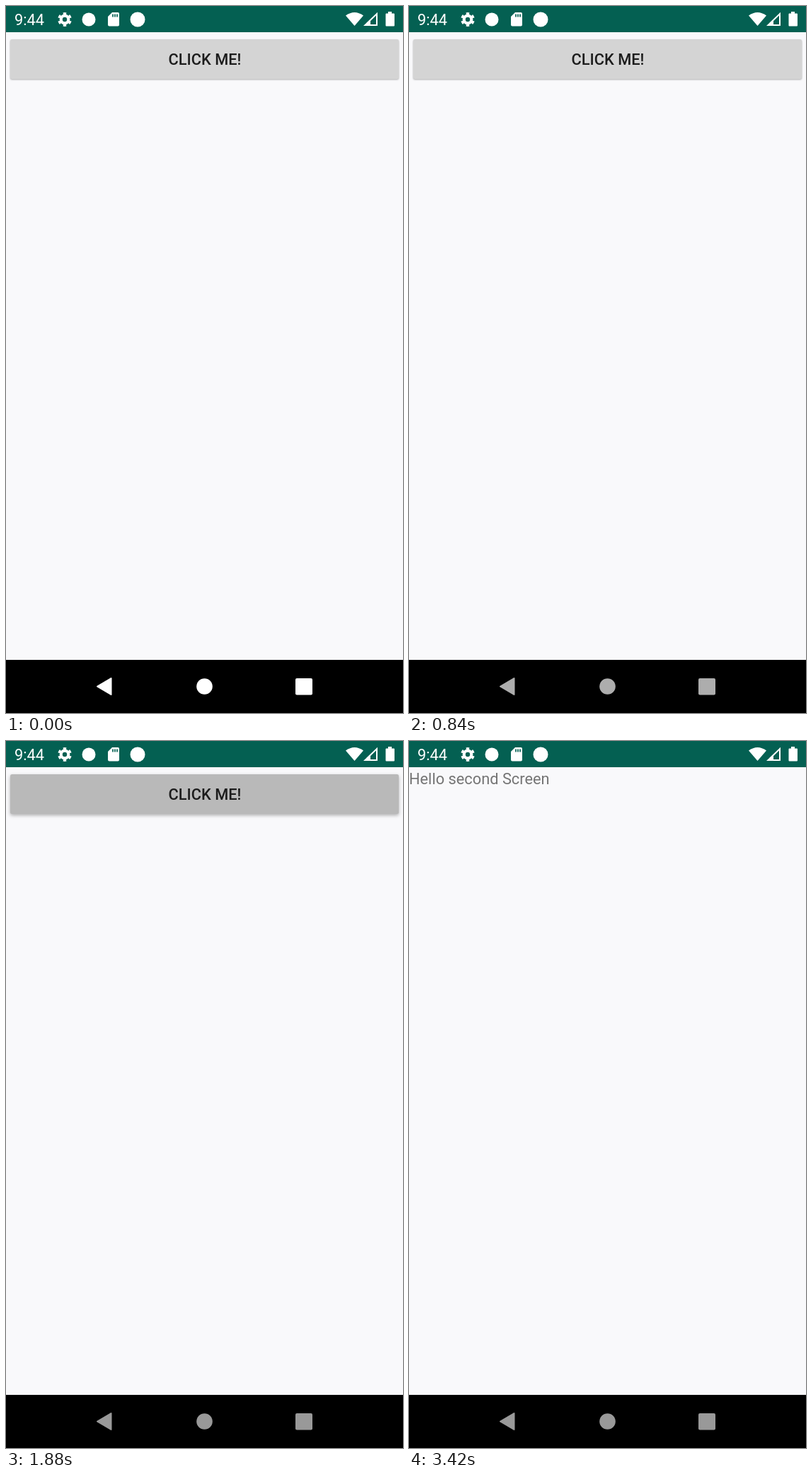
Recreate the animation shown at these times as an HTML page. Size 561 px wide and 998 px high, loop 3460 ms.

```html
<!DOCTYPE html>
<html lang="en">
<head>
<meta charset="utf-8">
<title>Button opens second screen</title>
<style>
  html, body { margin: 0; width: 100%; height: 100%; overflow: hidden; background: #f9f9fb; }
  svg { display: block; }
  text { font: 21.8px Roboto, sans-serif; }
  .label { font-weight: 500; fill: #1c1c1c; text-anchor: middle; }
</style>
</head>
<body>
<svg width="561" height="998" viewBox="0 0 561 998">
  <defs>
    <clipPath id="content"><rect y="37" width="561" height="886"/></clipPath>
    <clipPath id="reveal"><rect id="revealBox" width="561" height="886"/></clipPath>
  </defs>

  <rect width="561" height="998" fill="#f9f9fb"/>
  <g clip-path="url(#content)">
    <g id="first">
      <rect id="button" x="6" y="47" width="549" height="56" rx="2.5"/>
      <text class="label" x="281" y="83">CLICK ME!</text>
    </g>
    <g id="second" clip-path="url(#reveal)">
      <rect y="37" width="561" height="886" fill="#f9f9fb"/>
      <text id="hello" y="61" fill="#757575">Hello second Screen</text>
    </g>
  </g>

  <rect width="561" height="37" fill="#046052"/>
  <g fill="#fff">
    <text x="12" y="27">9:44</text>
    <g fill="none" stroke="#fff">
      <circle cx="83" cy="19" r="5.3" stroke-width="4.2"/>
      <circle cx="83" cy="19" r="8.2" stroke-width="3.4" pathLength="12" stroke-dasharray="1" stroke-dashoffset="-.5"/>
    </g>
    <circle cx="117" cy="19" r="9.5"/>
    <path d="M150 9h8q2 0 2 2v15.500q0 2-2 2h-12q-2 0-2-2V15z"/>
    <path d="M151 11.500v4m3-4v4m3-4v4" stroke="#046052" stroke-width="1.700"/>
    <circle cx="186" cy="19" r="10.500"/>
    <path d="M480 13.500Q492.500 4.500 505 13.500L492.500 28z"/>
    <path d="M507.500 27L524 11V27z" fill="none" stroke="#fff" stroke-width="2"/>
    <path d="M506 28L515 19V28z"/>
    <path d="M540 8h5v2.500h3q1 0 1 1V27.500q0 1-1 1h-10.500q-1 0-1-1v-16q0-1 1-1h2.500z"/>
  </g>

  <rect y="923" width="561" height="75"/>
  <g id="nav">
    <path d="M129 960.500L148.500 949V972z" stroke-width="2" stroke-linejoin="round"/>
    <circle cx="280.500" cy="960.500" r="11.300" stroke="none"/>
    <rect x="409" y="949" width="24" height="23.500" rx="2" stroke="none"/>
  </g>
</svg>
<script>
  const LOOP = 3460;
  const $ = id => document.getElementById(id);
  const progress = (t, from, to) => Math.min(1, Math.max(0, (t - from) / (to - from)));
  const mix = (a, b, p) => a + (b - a) * p;
  const gray = v => `rgb(${v},${v},${v})`;
  const shiftY = (id, y) => $(id).setAttribute('transform', `translate(0 ${y})`);

  function draw(t) {
    const navColor = gray(mix(255, 153, progress(t, 20, 1040)));
    $('nav').setAttribute('fill', navColor);
    $('nav').setAttribute('stroke', navColor);

    const press = progress(t, 1690, 1870);
    $('button').setAttribute('fill', gray(mix(212, 185, press)));
    $('button').style.filter =
      `drop-shadow(0 ${mix(1, 2, press)}px ${mix(1.2, 2.5, press)}px rgba(0,0,0,.3))`;

    // The second screen is revealed from the bottom and settles upwards.
    const open = 1 - (1 - progress(t, 2170, 2490)) ** 5;
    shiftY('first', -20 * open);
    shiftY('hello', 41 * (1 - open));
    $('revealBox').setAttribute('y', mix(923, 37, open));
  }

  const start = performance.now();
  function tick() {
    draw((performance.now() - start) % LOOP);
    requestAnimationFrame(tick);
  }
  tick();
</script>
</body>
</html>
```
